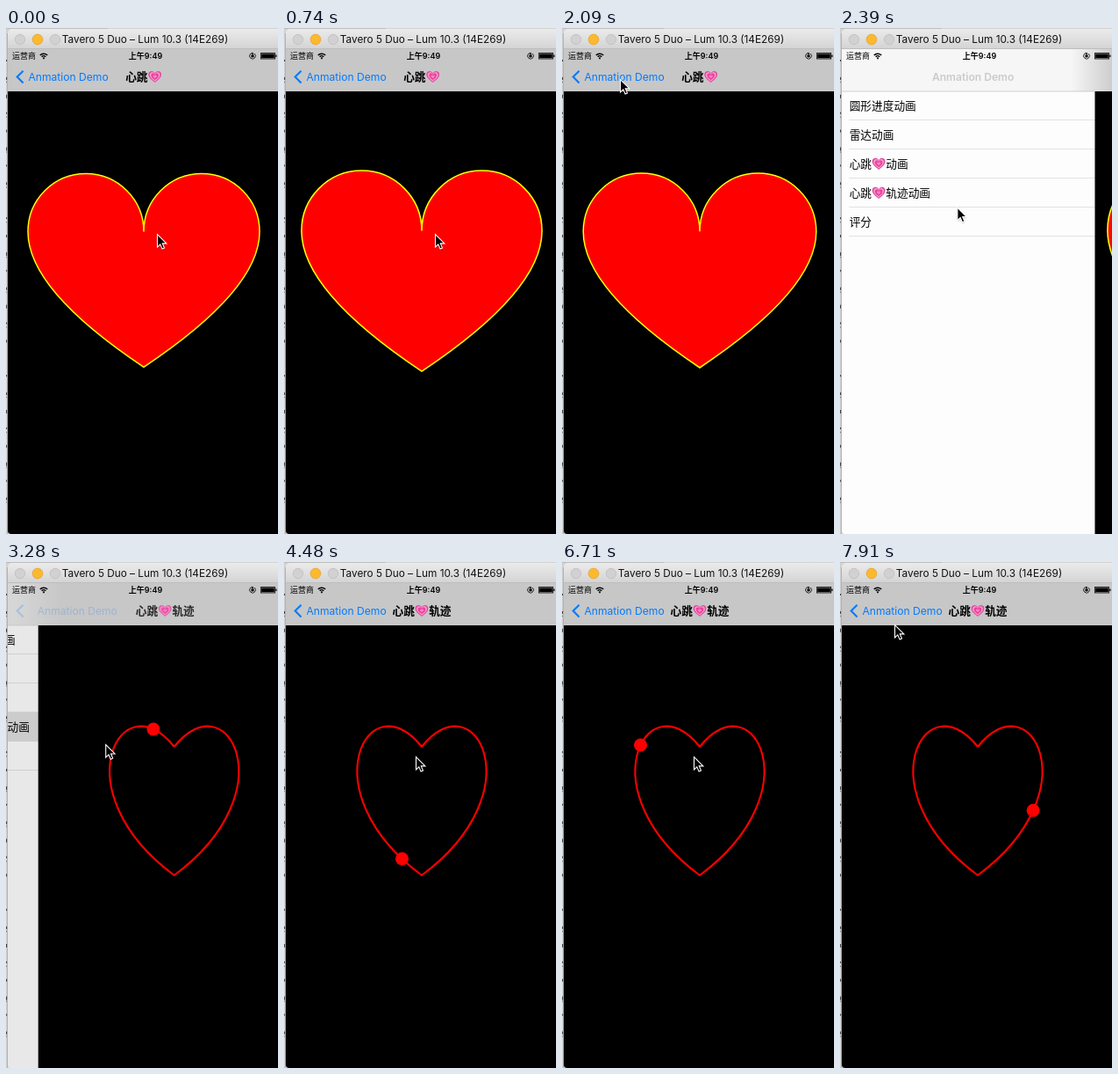
An HTML page with a canvas for the animation above (8000 ms loop, 310 by 575 pixels).

```html
<!DOCTYPE html>
<html lang="zh">
<head>
<meta charset="utf-8">
<title>Heart animations</title>
<style>
html, body { margin: 0; width: 100%; height: 100%; overflow: hidden; background: #000; }
canvas { display: block; width: 310px; height: 575px; }
</style>
</head>
<body>
<canvas id="stage"></canvas>
<script>
const W = 310, H = 575, LEFT = 2, TOP = 72, PAGE = W - LEFT, MID = 157;
const LOOP = 8000, STEP = 149.2;
const POP = 2134, PUSH = 3070, SELECT = 2930;
const FONT = 'Inter, "Noto Sans CJK SC", "Noto Sans CJK JP", "Noto Sans CJK", sans-serif';
const HEART = '\u2665';
const ROWS = ['圆形进度动画', '雷达动画', '心跳♥动画', '心跳♥轨迹动画', '评分'];

// time, x, y of the pointer tip
const POINTER = [
  [0, 172, 234], [800, 172, 234], [1190, 112, 118], [1490, 71, 64], [1700, 62, 55],
  [2090, 66, 58], [2390, 134, 205], [2700, 122, 190], [3080, 113, 190], [3280, 113, 207],
  [3680, 150, 221], [7160, 150, 221], [7760, 66, 78], [7900, 62, 71]
];

const canvas = document.getElementById('stage');
const dpr = window.devicePixelRatio || 1;
canvas.width = W * dpr;
canvas.height = H * dpr;
const c = canvas.getContext('2d');

const clamp = v => Math.max(0, Math.min(1, v));
const gray = v => { v = Math.round(v); return `rgb(${v},${v},${v})`; };

function rect(x, y, w, h, fill) {
  c.fillStyle = fill;
  c.fillRect(x, y, w, h);
}

function disc(x, y, r, fill, stroke) {
  c.beginPath();
  c.arc(x, y, r, 0, 7);
  c.fillStyle = fill;
  c.fill();
  if (stroke) {
    c.strokeStyle = stroke;
    c.lineWidth = 0.7;
    c.stroke();
  }
}

// Critically damped spring from 0 to 1
function spring(ms) {
  if (ms <= 0) return 0;
  const x = ms * 0.0176, v = 1 - (1 + x) * Math.exp(-x);
  return v > 0.998 ? 1 : v;
}

function pointerAt(t) {
  let i = 1;
  while (i < POINTER.length - 1 && POINTER[i][0] < t) i++;
  const [t0, x0, y0] = POINTER[i - 1], [t1, x1, y1] = POINTER[i];
  const k = clamp((t - t0) / (t1 - t0));
  return [x0 + (x1 - x0) * k, y0 + (y1 - y0) * k];
}

function pinkHeart(x, y, size) {
  const layers = [[1, '#e2489f'], [0.8, '#fa9ad0'], [0.58, '#ea3f9b'], [0.3, '#f884c4']];
  for (const [k, color] of layers) {
    const r = size * k / 2;
    c.beginPath();
    c.moveTo(x, y - r * 0.55);
    c.bezierCurveTo(x - r * 0.45, y - r * 1.25, x - r * 1.3, y - r * 0.75, x - r * 0.95, y);
    c.bezierCurveTo(x - r * 0.75, y + r * 0.4, x - r * 0.3, y + r * 0.65, x, y + r * 0.95);
    c.bezierCurveTo(x + r * 0.3, y + r * 0.65, x + r * 0.75, y + r * 0.4, x + r * 0.95, y);
    c.bezierCurveTo(x + r * 1.3, y - r * 0.75, x + r * 0.45, y - r * 1.25, x, y - r * 0.55);
    c.fillStyle = color;
    c.fill();
  }
}

// Text with hearts drawn in line; y is the vertical middle
function label(text, x, y, size, { weight = 400, color = '#000', align = 'left' } = {}) {
  c.font = `${weight} ${size}px ${FONT}`;
  c.textBaseline = 'alphabetic';
  c.textAlign = 'left';
  const parts = text.split(HEART), gap = size * 1.28;
  const width = parts.reduce((sum, p) => sum + c.measureText(p).width, gap * (parts.length - 1));
  if (align === 'center') x -= width / 2;
  parts.forEach((part, i) => {
    if (i) {
      pinkHeart(x + gap / 2, y - 0.3, size * 1.13);
      x += gap;
    }
    c.fillStyle = color;
    c.fillText(part, x, y + size * 0.37);
    x += c.measureText(part).width;
  });
}

function beatingHeart(t) {
  const s = 1.037 - 0.037 * Math.cos(t * Math.PI / 500), r = 66 * s;
  c.save();
  c.translate(MID, 257 - 25.5 * s);
  c.beginPath();
  c.moveTo(0, 0);
  c.arc(-r, 0, r, 0, Math.PI, true);
  c.quadraticCurveTo(-2 * r, r, 0, 2.33 * r);
  c.quadraticCurveTo(2 * r, r, 2 * r, 0);
  c.arc(r, 0, r, 0, Math.PI, true);
  c.fillStyle = '#f00';
  c.fill();
  c.strokeStyle = '#ff0';
  c.lineWidth = 1.5 * s;
  c.stroke();
  c.restore();
}

function trackHeart(t) {
  const a = 60, b = 130, up = -76, low = 50, tip = 146;
  c.save();
  c.translate(MID, 210);
  c.beginPath();
  c.moveTo(0, 0);
  c.bezierCurveTo(-a, up, -b, low, 0, tip);
  c.bezierCurveTo(b, low, a, up, 0, 0);
  c.strokeStyle = '#f00';
  c.lineWidth = 2.1;
  c.stroke();
  // 0..1 runs down the left side, 1..2 back up the right
  const p = Math.max(0, (t - 3087) * 0.000674) % 2;
  const k = p < 1 ? p : 2 - p, u = 1 - k;
  const f1 = 3 * u * u * k, f2 = 3 * u * k * k;
  const x = (f1 * a + f2 * b) * (p < 1 ? -1 : 1);
  disc(x, f1 * up + f2 * low + k * k * k * tip, 7.5, '#f00');
  c.restore();
}

function list(cover, selected) {
  c.save();
  c.translate(-0.3 * PAGE * cover, 0);
  rect(LEFT, TOP, PAGE, H - TOP, '#fff');
  if (selected) rect(LEFT, 171, PAGE, 33, '#e0e0e0');
  ROWS.forEach((text, i) => {
    label(text, 16.5, 88.5 + 33 * i, 12.7);
    rect(16, 104 + 33 * i, PAGE, 0.8, '#dedede');
  });
  c.restore();
  rect(LEFT, TOP, PAGE, H - TOP, `rgba(0,0,0,${0.1 * cover})`);
}

function navBar(s) {
  const edge = LEFT + s.off;
  const light = gray(249 - 40 * s.cover), dark = '#c7c7c7';
  let fill = s.cover === 1 ? dark : light;
  if (s.cover > 0 && s.cover < 1) {
    fill = c.createLinearGradient(edge - 27, 0, edge + 27, 0);
    fill.addColorStop(0, light);
    fill.addColorStop(1, dark);
  }
  rect(LEFT, 24, PAGE, TOP - 24, fill);
  if (s.cover < 1) rect(LEFT, TOP - 0.4, s.off, 0.8, '#c4c4c4');

  c.globalAlpha = s.back;
  c.beginPath();
  c.moveTo(19.6, 48.7);
  c.lineTo(12.7, 55.6);
  c.lineTo(19.6, 62.5);
  c.strokeStyle = '#007aff';
  c.lineWidth = 2.1;
  c.stroke();
  label('Anmation Demo', 25.5 + 90 * (1 - s.cover), 55.6, 12.1, { color: '#007aff' });

  c.globalAlpha = s.title;
  label(s.track ? '心跳♥轨迹' : '心跳♥', MID + 0.7 * s.off, 55.6, 12.7, { weight: 600, align: 'center' });

  c.globalAlpha = s.home;
  label('Anmation Demo', MID - 85 * s.cover, 55.6, 12.1, { weight: 600, align: 'center' });
  c.globalAlpha = 1;
}

function statusBar() {
  label('运营商', 7, 31.7, 9);
  label('上午9:49', 159, 31.7, 9, { weight: 600, align: 'center' });
  c.strokeStyle = '#000';
  c.lineWidth = 1.4;
  for (const r of [3.2, 5.8]) {
    c.beginPath();
    c.arc(43, 35, r, -Math.PI * 0.76, -Math.PI * 0.24);
    c.stroke();
  }
  disc(43, 34.3, 1.1, '#000');
  c.lineWidth = 0.8;
  c.beginPath();
  c.arc(281, 31.7, 3.4, -0.9, 5);
  c.stroke();
  rect(279.5, 31, 3, 2.4, '#000');
  c.strokeRect(280.2, 29.7, 1.6, 2);
  c.strokeRect(290.4, 28.6, 16.2, 6.4);
  rect(291.2, 29.4, 14.6, 4.8, '#000');
  rect(307.3, 30.5, 1.2, 2.6, '#000');
}

function titleBar() {
  const fill = c.createLinearGradient(0, 0, 0, 24);
  fill.addColorStop(0, '#ececec');
  fill.addColorStop(1, '#d4d3d4');
  c.beginPath();
  c.roundRect(LEFT, 1, PAGE + 8, 30, 5);
  c.fillStyle = fill;
  c.fill();
  rect(LEFT, 23.3, PAGE, 0.7, '#b5b5b5');
  disc(16, 13, 5.7, '#d2d0d2', '#bcbabc');
  disc(36, 13, 5.9, '#fdb92d', '#e2a02a');
  disc(56, 13, 5.7, '#d2d0d2', '#bcbabc');
  label('Tavero 5 Duo – Lum 10.3 (14E269)', 158.5, 13, 11.8, { color: '#111', align: 'center' });
}

// Sliver of the window behind
function backdrop() {
  rect(0, 0, W, H, '#d2d2d2');
  rect(0, 0, 116, 1, '#bdbdbd');
  for (let y = 38, i = 0; y < 570; y += 19.9, i++) {
    if (i % 9 === 8) continue;
    rect(0, y - 2, 1.2, 2 + i % 3, '#444');
    if (i % 2) rect(0, y + 3, 1, 1.2, '#777');
  }
  rect(1.4, 6, 0.6, H, '#999');
}

function pointer(x, y) {
  const pts = [[0, 0], [0, 14.5], [3.3, 11.4], [5.6, 16.6], [8, 15.5], [5.8, 10.4], [10.4, 10.4]];
  c.save();
  c.translate(x, y);
  c.beginPath();
  pts.forEach(([px, py]) => c.lineTo(px + 0.5, py + 0.5));
  c.closePath();
  c.shadowColor = 'rgba(0,0,0,.35)';
  c.shadowBlur = 2;
  c.shadowOffsetY = 1;
  c.fillStyle = '#000';
  c.fill();
  c.shadowColor = 'transparent';
  c.strokeStyle = '#fff';
  c.lineWidth = 1.1;
  c.stroke();
  c.restore();
}

function stateAt(t) {
  const track = t >= PUSH;
  const q = spring(t - (track ? PUSH : POP));
  const cover = track ? q : 1 - q;
  const fadeIn = clamp((t - (track ? PUSH + 170 : POP + 220)) / 190);
  const fadeOut = clamp(1 - q / 0.7);
  return {
    track, cover, off: PAGE * (1 - cover),
    back: track ? fadeIn : fadeOut,
    title: track ? q * q : fadeOut,
    home: track ? fadeOut : fadeIn
  };
}

function draw(t) {
  const s = stateAt(t);
  c.setTransform(dpr, 0, 0, dpr, 0, 0);
  backdrop();
  titleBar();
  c.save();
  c.beginPath();
  c.roundRect(LEFT, 24, PAGE + 8, H - 24, [0, 0, 0, 4]);
  c.clip();
  if (s.cover < 1) list(s.cover, t >= SELECT);
  if (s.cover > 0) {
    c.save();
    c.translate(s.off, 0);
    rect(LEFT, TOP, PAGE, H - TOP, '#000');
    if (s.track) trackHeart(t);
    else beatingHeart(t);
    c.restore();
  }
  navBar(s);
  statusBar();
  c.restore();
  pointer(...pointerAt(t));
}

const start = performance.now();
function tick() {
  const t = (performance.now() - start) % LOOP;
  // The recording has a coarse, even cadence
  draw(Math.floor((t + 8) / STEP) * STEP);
  requestAnimationFrame(tick);
}
tick();
</script>
</body>
</html>
```
